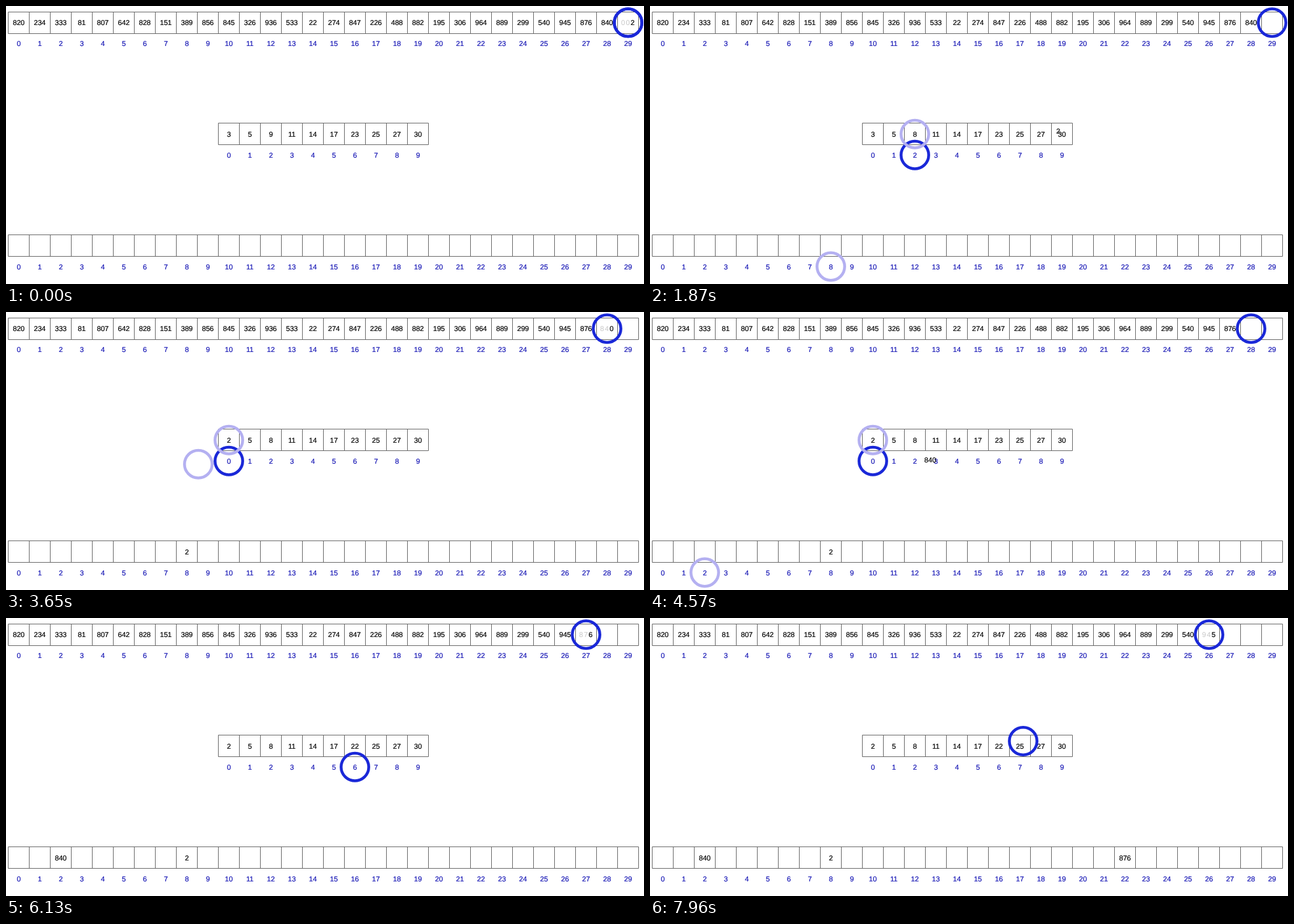
An HTML page for the animation above (8 s loop, 1002 by 438 pixels).

```html
<!DOCTYPE html>
<html lang="en">
<head>
<meta charset="utf-8">
<title>Radix sort</title>
<style>
  html, body { margin: 0; width: 100%; height: 100%; overflow: hidden; background: #fff; }
  svg { display: block; width: 1002px; height: 438px; }
  text { font: 11.2px "Liberation Sans", Arial, sans-serif; text-anchor: middle;
    text-rendering: geometricPrecision; fill: #000; stroke: #000; stroke-width: 0.2; }
  .index { fill: #1414b4; stroke: #1414b4; }
  .dim { fill: #c6c6c6; stroke: none; }
  .grid { fill: none; stroke: #6a6a6a; stroke-width: 1; }
  circle { fill: none; stroke: #1a28d8; stroke-width: 4.5; }
  .light { stroke: #b4b0f1; }
</style>
</head>
<body>
<svg viewBox="0 0 1002 438"></svg>
<script>
const svg = document.querySelector('svg');
const LOOP = 8000, FPS = 23, LAST_TICK = 183;
const PITCH = 33, HEIGHT = 34, INDEX_GAP = 33;
const DATA = [820, 234, 333, 81, 807, 642, 828, 151, 389, 856, 845, 326, 936, 533, 22,
  274, 847, 226, 488, 882, 195, 306, 964, 889, 299, 540, 945, 876, 840, 2];
const COUNTS = [3, 5, 9, 11, 14, 17, 23, 25, 27, 30];
// [time in ms, progress in steps]; every value takes four steps
const PACE = [[0, 0], [600, 1], [892, 2], [1174, 2.4615], [2565, 4.508],
  [4565, 7.587], [7304, 11.735], [7957, 12.805]];

function add(tag, attrs, content = '') {
  const el = document.createElementNS('http://www.w3.org/2000/svg', tag);
  for (const key in attrs) el.setAttribute(key, attrs[key]);
  el.textContent = content;
  return svg.appendChild(el);
}

function addRow(length, left, y) {
  const right = left + length * PITCH;
  const top = Math.floor(y - HEIGHT / 2) + 0.5;  // keeps the lines crisp
  let path = `M${left} ${top}H${right}v${HEIGHT}H${left}z`;
  for (let i = 1; i < length; i++) path += `M${left + i * PITCH} ${top}v${HEIGHT}`;
  add('path', { d: path, class: 'grid' });
  const x = i => left + (i + 0.5) * PITCH;
  const cells = Array.from({ length }, (_, i) => {
    add('text', { x: x(i), y: y + INDEX_GAP + 4, class: 'index' }, i);
    return add('text', { x: x(i), y: y + 4 });
  });
  return { x, y, cells };
}

const input = addRow(30, 3.5, 26.3);
const counter = addRow(10, 333.5, 201.8);
const output = addRow(30, 3.5, 377.5);
const digits = ['dim', 'dim', ''].map(name => add('text', { class: name }));
const [home, pointer] = ['', ''].map(() => add('circle', { r: 21.7 }));
const [source, target] = ['', ''].map(() => add('circle', { r: 21.7, class: 'light' }));
const label = add('text', {});

const show = (el, on) => el.setAttribute('visibility', on ? 'visible' : 'hidden');
const mix = (a, b, k) => a + (b - a) * k;

function place(circle, from, to = from, k = 0) {
  circle.setAttribute('cx', mix(from[0], to[0], k));
  circle.setAttribute('cy', mix(from[1], to[1], k));
}

function progressAt(time) {
  const i = Math.max(1, PACE.findIndex(([t]) => t >= time));
  const [t0, p0] = PACE[i - 1], [t1, p1] = PACE[i];
  return mix(p0, p1, (time - t0) / (t1 - t0));
}

function draw(time) {
  const tick = Math.min(LAST_TICK, Math.floor((time + 5) * FPS / 1000));
  const progress = progressAt(tick * 1000 / FPS);
  const done = Math.floor(progress / 4);
  const step = Math.floor(progress % 4), k = progress % 1;
  const current = DATA.length - 1 - done;

  const counts = [...COUNTS], sorted = [];
  for (let i = DATA.length - 1; i > current; i--) sorted[--counts[DATA[i] % 10]] = DATA[i];
  const value = DATA[current], digit = value % 10;
  const slot = counts[digit] - 1;
  if (step > 0) counts[digit]--;

  input.cells.forEach((cell, i) => cell.textContent = i < current ? DATA[i] : '');
  counter.cells.forEach((cell, i) => cell.textContent = counts[i]);
  output.cells.forEach((cell, i) => cell.textContent = sorted[i] ?? '');

  const start = [input.x(current), input.y];
  const count = [counter.x(digit), counter.y];
  const countIndex = [count[0], counter.y + INDEX_GAP];
  const outIndex = [output.x(slot), output.y + INDEX_GAP];

  const padded = String(value).padStart(3, '0');
  digits.forEach((el, i) => {
    show(el, step < 3);
    el.textContent = padded[i];
    el.setAttribute('x', start[0] - 0.5 + (i - 1) * 7.5);
    el.setAttribute('y', input.y + 4);
  });

  place(home, start);
  place(pointer, start, countIndex, step ? 1 : k);
  place(source, count);
  place(target, count, outIndex, step > 2 ? 1 : k);
  show(source, step > 1);
  show(target, step > 1);

  show(label, step > 2);
  label.textContent = value;
  label.setAttribute('x', mix(start[0], output.x(slot), k));
  label.setAttribute('y', mix(input.y, output.y, k) + 4);
}

const begin = performance.now();
function frame() {
  draw((performance.now() - begin) % LOOP);
  requestAnimationFrame(frame);
}
frame();
</script>
</body>
</html>
```
